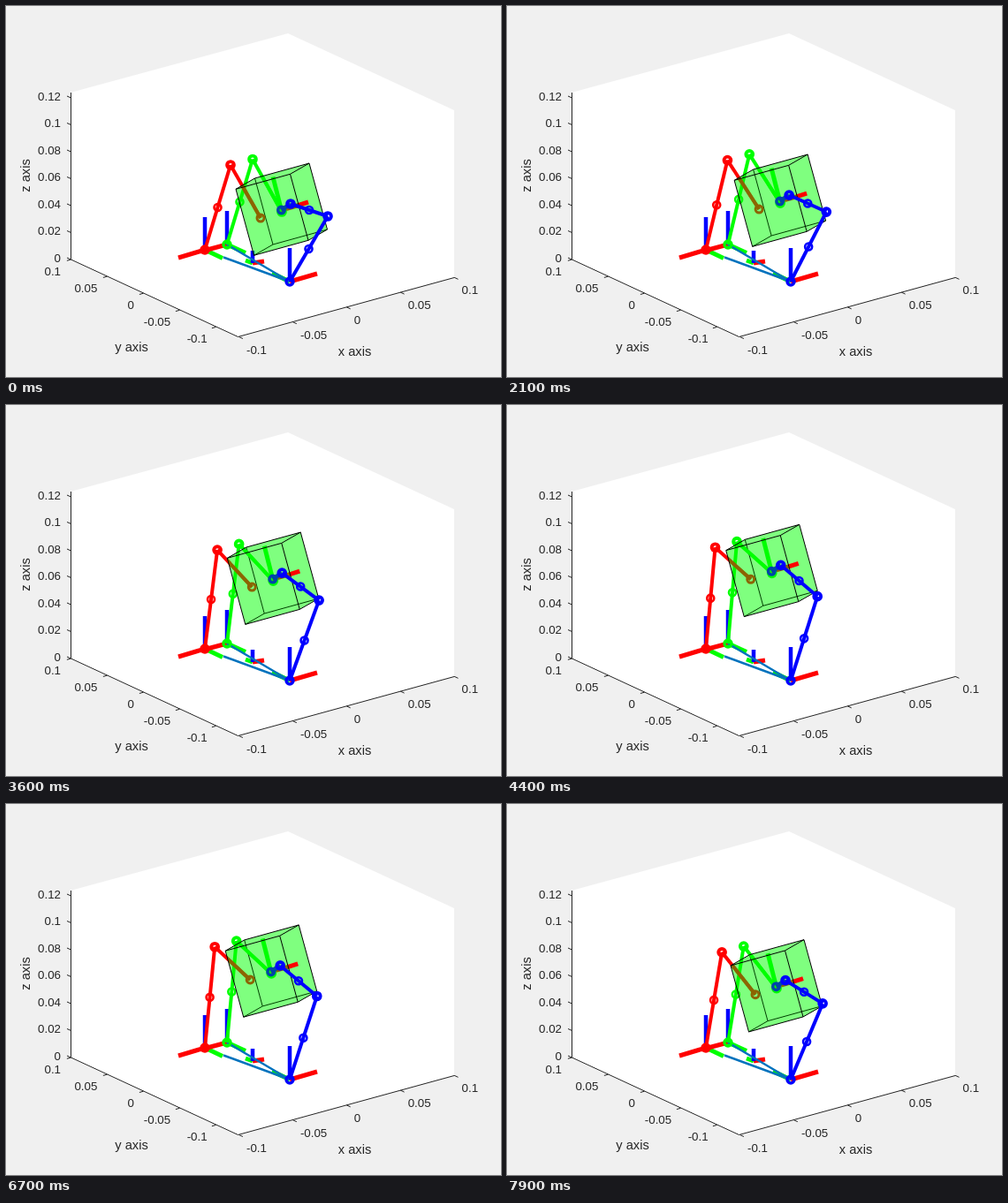
Write an HTML page that moves like this. It is 560 px wide and 420 px high and loops after 8000 ms.

```html
<!DOCTYPE html>
<html lang="en">
<head>
<meta charset="utf-8">
<title>Three-finger grasp</title>
<style>
  html, body { margin: 0; width: 100%; height: 100%; overflow: hidden; background: #f0f0f0; }
  svg { display: block; width: 100vw; height: 100vh; }
  text { font-family: "Liberation Sans", Arial, sans-serif; font-size: 13.33px; fill: #262626; }
  .title { font-size: 14.67px; text-anchor: middle; }
</style>
</head>
<body>
<svg id="stage" viewBox="0 0 560 420">
  <defs><clipPath id="inside"><path id="silhouette"/></clipPath></defs>
  <path d="M73 98L319 31L507 118V307L262.500 374.500L73 287Z" fill="#fff"/>
  <g id="axes"></g>
  <g id="base"></g>
  <g id="arms"></g>
</svg>
<script>
const RED = '#f00', GREEN = '#0f0', BLUE = '#00f', BROWN = '#8c6400', NAVY = '#0046a8';
const byId = id => document.getElementById(id);

const line = (a, b, color, width = 4) =>
  `<path d="M${a}L${b}" stroke="${color}" stroke-width="${width}" fill="none"/>`;
const ring = ([x, y], color, r = 4, width = 2.6) =>
  `<circle cx="${x}" cy="${y}" r="${r}" stroke="${color}" stroke-width="${width}" fill="none"/>`;
const label = (x, y, text, anchor = 'start') =>
  `<text x="${x}" y="${y}" text-anchor="${anchor}">${text}</text>`;
const poly = points => 'M' + points.join('L') + 'Z';
const add = (...vs) => [0, 1].map(i => vs.reduce((sum, v) => sum + v[i], 0));
const mid = (a, b) => [(a[0] + b[0]) / 2, (a[1] + b[1]) / 2];

function drawAxes() {
  const ink = '#262626';
  let out = line([73.5, 98], [73.5, 287], ink, 1)
    + line([73.5, 287], [262.5, 374.5], ink, 1)
    + line([262.5, 374.5], [507, 307.5], ink, 1);
  ['0', '0.02', '0.04', '0.06', '0.08', '0.1', '0.12'].forEach((text, i) => {
    const y = 287 - 30.5 * i;
    out += line([73.5, y], [69, y - 2], ink, 1) + label(62, y + 2.5, text, 'end');
  });
  ['0.1', '0.05', '0', '-0.05', '-0.1'].forEach((text, i) => {
    const x = 73.5 + 41 * i, y = 287 + 19.1 * i;
    out += line([x, y], [x - 4.6, y + 1.3], ink, 1) + label(62 + 41.4 * i, y + 17.5, text, 'end');
  });
  ['-0.1', '-0.05', '0', '0.05', '0.1'].forEach((text, i) => {
    const x = 263.5 + 60.9 * i, y = 374.5 - 16.8 * i;
    out += line([x, y], [x + 4.4, y + 2], ink, 1) + label(x + 8.5, y + 19, text);
  });
  out += '<text class="title" x="394.500" y="396">x axis</text>'
    + '<text class="title" x="142" y="391">y axis</text>'
    + '<text class="title" transform="translate(27 192) rotate(-90)">z axis</text>';
  byId('axes').innerHTML = out;
}

const BASES = { red: [225, 276], green: [250, 270], blue: [321, 312] };

function triad(origin, x, y, z) {
  return line(origin, add(origin, x), RED, 5)
    + line(origin, add(origin, y), GREEN, 5)
    + line(origin, add(origin, z), BLUE, 4.5);
}

function drawBase() {
  const { red, green, blue } = BASES;
  byId('base').innerHTML =
    triad(red, [-30, 9], [20, 9.5], [0, -37])
    + triad(green, [-30, 8], [21, 9.5], [0, -38])
    + triad(blue, [31, -9], [-20, -9.5], [0, -38])
    + triad([279, 291], [13, -2], [-8, -3], [0, -14])
    + line([246, 284.5], blue, '#0072bd', 2.5)
    + line(green, blue, '#0072bd', 2.5);
}

// Knee paths: start, end and how far the middle bows away from a straight line.
const KNEES = {
  red: [[254, 180], [234.5, 160.5], [-0.4, -1.7]],
  green: [[279, 173.5], [259, 154], [-0.5, -2]],
  blue: [[364, 238], [350.3, 215.4], [0.5, 0]]
};
const knee = (name, f) => {
  const [from, to, bow] = KNEES[name];
  return [0, 1].map(i => from[i] + (to[i] - from[i]) * f + bow[i] * 4 * f * (1 - f));
};

function thigh(name, joint, color) {
  const base = BASES[name];
  return line(base, joint, color) + ring(base, color, 4, 3.4)
    + ring(mid(base, joint), color) + ring(joint, color, 3.9, 3.9);
}

function drawArms(f) {
  const shift = [-13 * f, -45.3 * f];
  const at = (x, y) => add([x, y], shift);
  const a = [61.5, -17], b = [20.5, 75], c = [-21.5, 12.3];
  const p = at(281.5, 195);
  const [pa, pb, pc] = [add(p, a), add(p, b), add(p, c)];
  const [pab, pac, pbc] = [add(pa, b), add(pa, c), add(pb, c)];
  const pabc = add(pab, c);
  const edge = (u, v, color = '#000') => line(u, v, color, 1);

  const redKnee = knee('red', f), greenKnee = knee('green', f), blueKnee = knee('blue', f);
  const redTip = at(288, 240), greenTip = at(312, 233), blueTip = at(322, 224);
  const center = at(311.5, 231);
  const outline = poly([p, pa, pab, pabc, pbc, pc]);
  byId('silhouette').setAttribute('d', outline);

  byId('arms').innerHTML =
    thigh('green', greenKnee, GREEN) + line(greenKnee, greenTip, GREEN)
    + thigh('red', redKnee, RED) + line(redKnee, redTip, RED)
    + `<path d="${outline}" fill="${GREEN}" fill-opacity=".5"/>`
    + edge(p, pb, '#004000') + edge(pb, pab, '#004000') + edge(pb, pbc, '#004000')
    + '<g clip-path="url(#inside)">'
    + line(redKnee, redTip, BROWN) + ring(redTip, BROWN, 4, 3)
    + line(greenKnee, greenTip, GREEN) + '</g>'
    + line(center, at(302, 193.5), GREEN, 5)
    + line(center, at(331, 225.5), BROWN, 5)
    + line(at(331, 225.5), at(342, 222), RED, 5)
    + ring(greenTip, GREEN, 3.9, 3.9)
    + line(center, blueTip, NAVY, 5) + ring(center, NAVY, 3.8, 3.4)
    + edge(p, pa) + edge(p, pc) + edge(pa, pac) + edge(pc, pac)
    + edge(pc, pbc) + edge(pac, pabc) + edge(pa, pab)
    + edge(pbc, pabc) + edge(pabc, pab)
    + thigh('blue', blueKnee, BLUE) + line(blueKnee, blueTip, BLUE)
    + ring(mid(blueKnee, blueTip), BLUE) + ring(blueTip, BLUE, 3.9, 3.9);
}

// Minimum-jerk move in 50 steps of 100 ms, up and then back.
const quintic = s => s * s * s * (10 - 15 * s + 6 * s * s);
const clamp = s => Math.min(1, Math.max(0, s));
function lift(ms) {
  const step = Math.floor(ms / 100);
  return step < 55 ? quintic(clamp((step - 4) / 50)) : 1 - quintic((step - 55) / 50);
}

let shown = -1, start = null;
function tick(now) {
  if (start === null) start = now;
  const f = lift((now - start) % 8000);
  if (f !== shown) drawArms(shown = f);
  requestAnimationFrame(tick);
}

drawAxes();
drawBase();
drawArms(0);
requestAnimationFrame(tick);
</script>
</body>
</html>
```
